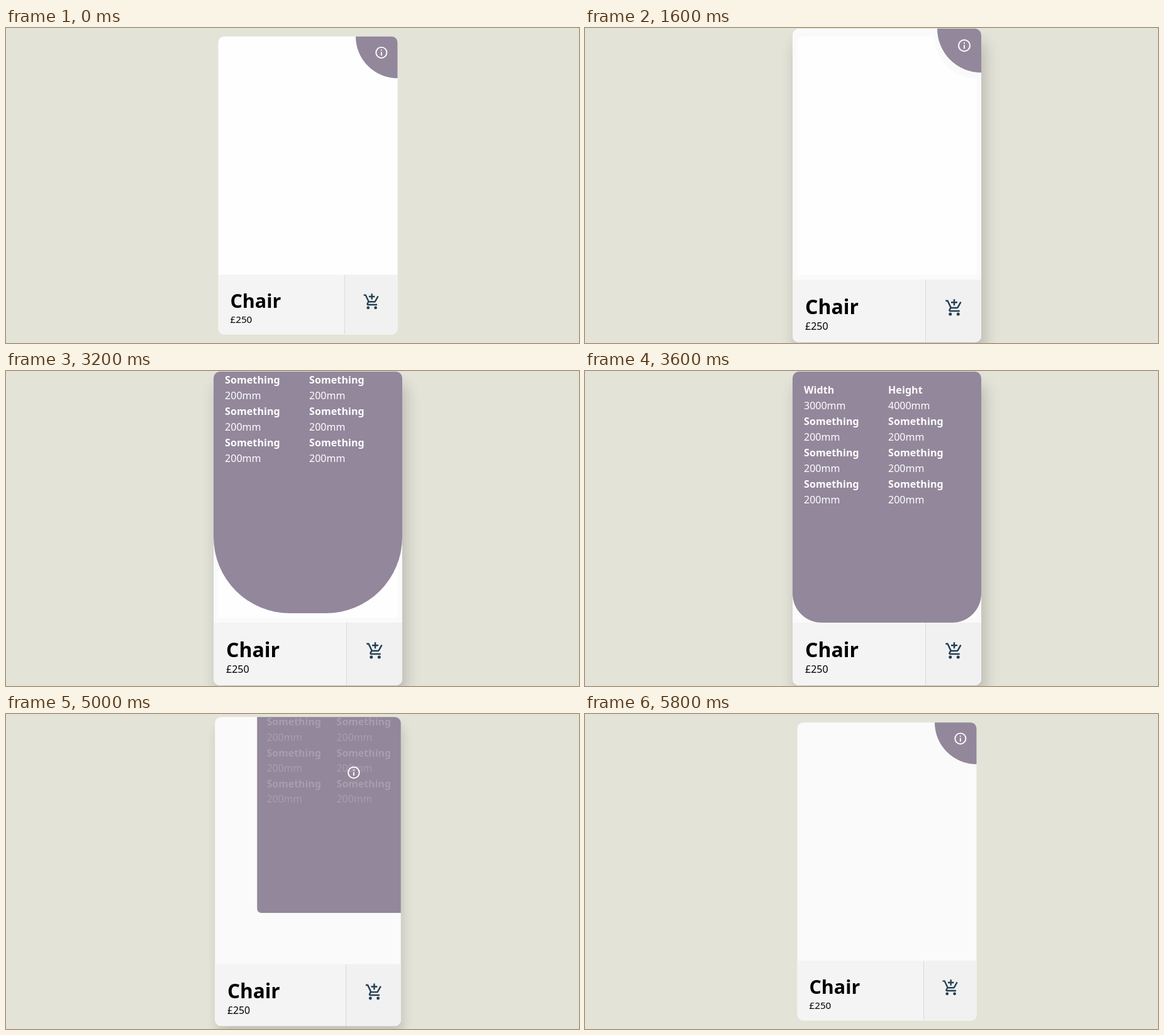
Recreate the animation shown at these times as an HTML page. Size 911 by 502 pixels, loop 6400 ms.

```html
<!DOCTYPE html>
<html lang="en">
<head>
<meta charset="utf-8">
<title>Product card</title>
<style>
html, body { margin: 0; width: 100%; height: 100%; overflow: hidden; background: #e3e3d8; }
body { position: relative; font: 16px/21px "Noto Sans", "Open Sans", sans-serif; color: #000; }
svg { position: absolute; fill: none; stroke: currentColor; stroke-width: 2; }
h1, p { margin: 0; }
h1 { font-size: 32px; line-height: 43px; }
h1, p, th, td { position: relative; top: 1px; }
#card { position: absolute; left: 330px; top: 1px; width: 300px; height: 500px; overflow: hidden; border-radius: 10px; background: #fafafa; }
#photo { position: absolute; inset: 0; }
#photo::before { content: ""; position: absolute; inset: 0 0 100px; border-radius: 10px 10px 0 0;
  background: radial-gradient(circle at 100% 0, #fafafa 70px, #fefefe 70.5px); }
.details { position: absolute; left: 0; top: 400px; width: 260px; height: 60px; padding: 20px; background: #f4f4f4; }
.buy { position: absolute; right: 0; top: 400px; width: 88px; height: 100px; background: #f1f1f1; border-left: 1px solid #dadada; color: #254053; }
.buy svg { left: 30px; top: 30px; }
#inside { position: absolute; overflow: hidden; background: #92879b; color: #fff; }
#icon { right: 85px; top: 85px; }
#contents { padding: 5%; }
table { width: 100%; table-layout: fixed; border-spacing: 2px; text-align: left; white-space: nowrap; }
th, td { padding: 1px; }
th { letter-spacing: 0.1px; }
</style>
</head>
<body>
<div id="card">
  <div id="photo"></div>
  <div class="details"><h1>Chair</h1><p>£250</p></div>
  <div class="buy">
    <svg width="30" height="30" viewBox="0 0 24 24">
      <path d="M12 1v8M8 5h8M1 3h2.6l4.3 9h7.7q.6 0 .9-.5l3.9-7M7.5 12l-1.4 2.5q-.5 1.5 1 1.5H19"/>
      <g fill="currentColor" stroke="none"><circle cx="7" cy="20" r="2"/><circle cx="17" cy="20" r="2"/></g>
    </svg>
  </div>
  <div id="inside">
    <svg id="icon" width="24" height="24" viewBox="0 0 24 24"><circle cx="12" cy="12" r="9"/><path d="M12 7v2M12 11v6"/></svg>
    <div id="contents"><table></table></div>
  </div>
</div>
<script>
const LOOP = 6400, STEP = 100, RATE = 1.125, LEAVE = 5000;
const [card, photo, inside, icon, contents] =
  ["card", "photo", "inside", "icon", "contents"].map(id => document.getElementById(id));

const row = (tag, a, b) => `<tr><${tag}>${a}</${tag}><${tag}>${b}</${tag}></tr>`;
const something = row("th", "Something", "Something") + row("td", "200mm", "200mm");
document.querySelector("table").innerHTML =
  row("th", "Width", "Height") + row("td", "3000mm", "4000mm") + something.repeat(3);

// The CSS "ease" curve, cubic-bezier(.25, .1, .25, 1)
function ease(x) {
  if (x <= 0) return 0;
  if (x >= 1) return 1;
  let low = 0, high = 1, s = 0.5;
  for (let i = 0; i < 24; i++) {
    s = (low + high) / 2;
    if (0.75 * s * (1 - s) + s ** 3 < x) low = s; else high = s;
  }
  return 0.3 * s * (1 - s) ** 2 + 3 * s * s * (1 - s) + s ** 3;
}

const mix = (a, b, p) => a + (b - a) * p;
const elapsed = (time, at, lead) => lead + (time - at) * RATE;

function draw(time) {
  const leaving = time >= LEAVE;
  const out = elapsed(time, LEAVE, 100);
  const level = (duration, entered) => leaving ? 1 - ease(out / duration) : ease(entered / duration);
  const overCard = elapsed(time, 1100, 30), overInfo = elapsed(time, 2800, 36);

  const lift = level(500, overCard), scale = mix(0.95, 1, lift);
  card.style.transform = `scale(${scale})`;
  card.style.boxShadow = `${5 * lift}px ${20 * lift}px ${24 * lift}px rgba(0,0,0,${0.2 * lift})`;
  photo.style.transform = `scale(${0.95 / scale})`;
  photo.style.visibility = time < 4500 ? "visible" : "hidden";

  const open = level(500, overInfo), radius = mix(200, 0, level(2000, overInfo));
  Object.assign(inside.style, {
    width: mix(140, 300, open) + "px",
    height: mix(140, 400, open) + "px",
    right: mix(-70, 0, open) + "px",
    top: mix(-70, 0, level(1000, overInfo)) + "px",
    borderRadius: `0 0 ${radius}px ${radius}px`
  });
  icon.style.opacity = overInfo > 0 && !leaving ? 0 : 1;
  contents.style.opacity = level(200, overInfo);
  contents.style.transform = `translateY(${mix(-200, 0, level(800, overInfo))}%)`;
}

const start = performance.now();
function tick() {
  const time = (performance.now() - start) % LOOP;
  draw(Math.floor(time / STEP) * STEP);
  requestAnimationFrame(tick);
}
tick();
</script>
</body>
</html>
```
